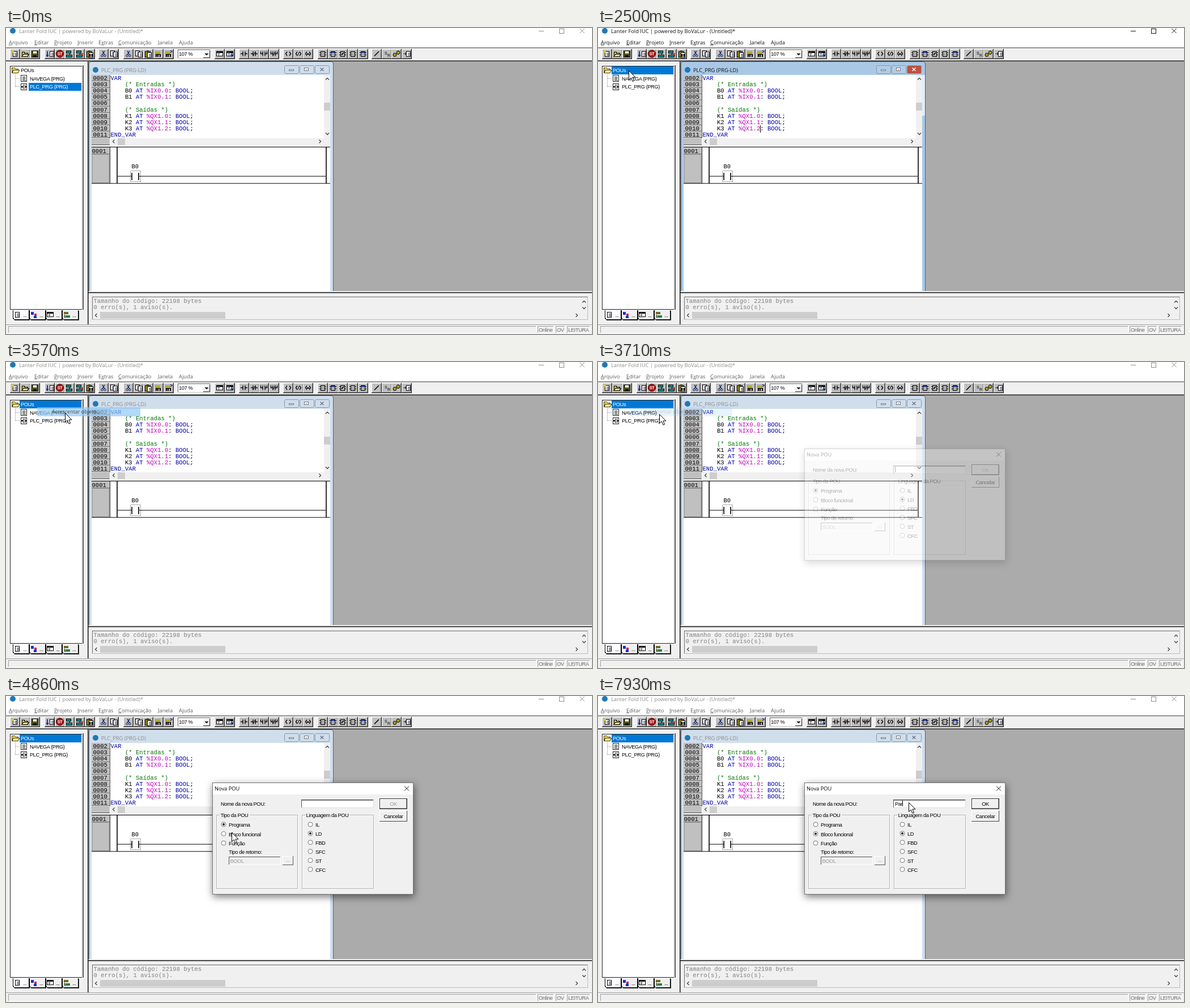
These frames come from a looping animation (1034 px wide and 541 px high, 8000 ms). An HTML page:

```html
<!DOCTYPE html>
<html lang="pt">
<head>
<meta charset="utf-8">
<title>Nova POU</title>
<style>
html,body{margin:0;width:100%;height:100%;overflow:hidden;background:#f0f0f0}
svg{display:block;width:100vw;height:100vh}
text{white-space:pre}
rect,path{shape-rendering:crispEdges}
.soft,.soft *{shape-rendering:auto}
.ui{font:9.3px "Open Sans","Noto Sans",sans-serif}
.ctx{font:9px "Open Sans","Noto Sans",sans-serif}
.ms{font:9.3px "Liberation Sans",Arial,sans-serif;letter-spacing:-.42px}
.mono{font:10.6px "Liberation Mono",monospace}
.mid{text-anchor:middle}
.k{fill:#0000a8}.m{fill:#c000c0}.g{fill:#007800}
.dim{fill:#6d6d6d}.off{fill:#9a9a9a}.inv{fill:#fff}
.u{text-decoration:underline}
.cap{fill:#8c8c8c}.menu{fill:#606060}.ctl{stroke:#8c8c8c;fill:none}
.frame{fill:#d0deec}.cbtn,.cx{fill:#d0deec}.cxi{stroke:#6c7682}.edge{fill:#d0deec}
.on .cap,.on .menu{fill:#111}.on .ctl{stroke:#111}
.on .frame{fill:#a9c8e6}.on .cbtn{fill:#b4cde6}.on .cx{fill:#c0503f}.on .cxi{stroke:#fff}
.on .edge{fill:#e2edf7}
</style>
</head>
<body>
<svg id="stage" viewBox="0 0 1034 541" preserveAspectRatio="none" xmlns="http://www.w3.org/2000/svg"></svg>
<script>
const FACE = '#f0f0f0', GREY = '#c0c0c0', BLUE = '#0078d7', SOFT = 'class="soft"';
const R = (x, y, w, h, f, a = '') => `<rect x="${x}" y="${y}" width="${w}" height="${h}" fill="${f}" ${a}/>`;
const T = (x, y, s, c, a = '') => `<text x="${x}" y="${y}" class="${c}" ${a}>${s}</text>`;
const P = (d, s = '#000', w = 1, f = 'none', a = '') => `<path d="${d}" stroke="${s}" stroke-width="${w}" fill="${f}" ${a}/>`;
const G = (id, s, a = '') => `<g id="${id}" ${a}>${s}</g>`;
const at = (x, y, s) => `<g transform="translate(${x} ${y})">${s}</g>`;
const bevel = (x, y, w, h, face, tl, br) => R(x, y, w, h, br) + R(x, y, w - 1, h - 1, tl) + R(x + 1, y + 1, w - 2, h - 2, face);
const chev = (x, y, dir) => at(x, y, `<g transform="rotate(${dir})">${P('M-1.5 -3L1.5 0L-1.5 3', '#444', 1.3, 'none', SOFT)}</g>`);
const disc = (x, y, r, f, a = '') => `<circle cx="${x}" cy="${y}" r="${r}" fill="${f}" ${a}/>`;

// toolbar icons, drawn around 0,0
const sheet = (x, y, f = '#fff') => R(x, y, 7, 9, f, 'stroke="#000"') + P(`M${x + 2} ${y + 3}h4m-4 2h4m-4 2h4`, '#446', 1);
const glyph = {
  new: sheet(-3.5, -4.5) + R(-6, -6, 4, 4, '#d8c820'),
  open: P('M-6 5V-3H-2L-1 -1H4V5Z', '#000', 1, '#e0c83c') + P('M-6 5L-3 1H6L4 5Z', '#000', 1, '#f4e478'),
  save: R(-5.5, -5.5, 11, 11, '#56561c', 'stroke="#000"') + R(-3, -5, 6, 4, '#fff') + R(-3, 2, 6, 4, '#111'),
  run: sheet(0.5, -4.5) + P('M-4 -5V4M-6 2L-4 5L-2 2', '#2038b0', 1.5),
  stop: disc(0, 0, 6.5, '#b01818', 'stroke="#400"') + T(0, 2.6, 'ST', 'ms mid', 'fill="#fff" style="font-size:7px;font-weight:700"'),
  link: R(-5.5, -5.5, 8, 4, '#1c8c8c', 'stroke="#000"') + R(-5.5, 1.5, 10, 4, '#1c8c8c', 'stroke="#000"') + P('M0 -1V1'),
  cut: P('M-2 -5L2 2M2 -5L-2 2', '#102070', 1.4, 'none', SOFT) + disc(-2.5, 3.5, 1.8, 'none', 'stroke="#102070"') + disc(2.5, 3.5, 1.8, 'none', 'stroke="#102070"'),
  copy: sheet(-5.5, -5.5) + sheet(-0.5, -3.5),
  paste: R(-5.5, -4.5, 9, 10, '#8c8424', 'stroke="#000"') + R(-3, -6, 4, 2, '#222') + sheet(-1.5, -2.5),
  find: R(-6, -5, 9, 6, '#b8ac30') + P('M-4 0V5M-1 0V5M3 0V5', '#000', 2.6) + P('M-4 1H4'),
  grid: R(-5.5, -4.5, 11, 8, '#fff', 'stroke="#000"') + P('M-5 -3H5', '#000', 2) + P('M-4 0H1M-2 -4V3', '#555'),
  no: P('M-6 0H-2M-2 -4V4M2 -4V4M2 0H6', '#000', 1.4, 'none', SOFT),
  coil: P('M-2 -3.5L-4.5 0L-2 3.5M2 -3.5L4.5 0L2 3.5', '#000', 1.3, 'none', SOFT),
  box: R(-3.5, -4.5, 7, 9, '#a8a8a8', 'stroke="#000"') + P('M-6 -2H-3M-6 2H-3M3 -2H6M3 2H6'),
  pen: P('M-4 4L4 -4', '#000', 1.6, 'none', SOFT),
  sr: T(-4, 1, 'S', 'ms', 'style="font-size:7px"') + T(1, 5, 'R', 'ms', 'style="font-size:7px"'),
  eyes: disc(-3, 2, 3, '#a8a020', 'stroke="#000"') + disc(3, -2, 3, '#a8a020', 'stroke="#000"'),
};
glyph.linkx = glyph.link + P('M2 -1L6 3M6 -1L2 3', '#c01818', 1.4);
glyph.clip = glyph.paste + P('M0 0V5M4 0V5', '#000', 2.4);
glyph.next = glyph.find + P('M3 -6L6 -4L3 -2', '#2038b0', 1.5);
glyph.gridx = glyph.grid + P('M3 -2V4M1 2L3 5L5 2', '#2050d0', 1.4);
glyph.nc = glyph.no + P('M-2 4L2 -4', '#000', 1, 'none', SOFT);
glyph.por = P('M-5.5 -4V0H-2M-2 -4V4M2 -4V4M2 0H5.5V-4', '#000', 1.3, 'none', SOFT);
glyph.pnc = glyph.por + P('M-2 4L2 -4', '#000', 1, 'none', SOFT);
glyph.coilx = glyph.coil + P('M-1 3L1 -3', '#000', 1, 'none', SOFT);
glyph.coils = glyph.coil + P('M-2 0H2', '#000', 2);
glyph.boxb = glyph.box + P('M-3 -3H3', '#2038b0', 2);
glyph.boxx = glyph.box + P('M-2 2L2 -2');
glyph.out = sheet(-0.5, -4.5) + P('M-6 0H-1M-3 -2L-1 0L-3 2', '#2038b0', 1.3);

const bar = [
  [16, 'new open save'], [77, 'run stop link linkx clip'], [172, 'cut copy'],
  [216, 'cut copy paste find next'], [377, 'grid gridx'], [420, 'no nc por pnc'],
  [498, 'coil coilx coils'], [559, 'box boxb boxx box boxb'], [654, 'pen sr eyes out'],
];
const toolbar = () => bar.map(([x, names]) => names.split(' ').map((n, i) => {
  const cx = Math.round(x + i * 17.7);
  return R(cx - 9, 37, 18, 18, '#222') + R(cx - 9, 37, 17, 17, '#fff') + R(cx - 8, 38, 15, 15, GREY) +
    P(`M${cx - 8} 53.5H${cx + 7.5}V38`, '#808080') + at(cx, 45.5, glyph[n]);
}).join('')).join('') +
  bevel(303, 38, 58, 16, '#fff', '#666', '#ccc') + T(305, 49, '107 %', 'ms') +
  bevel(348, 40, 12, 13, FACE, '#fff', '#333') + P('M351 45H357L354 48.5Z', 'none', 0, '#000');

function header() {
  const menus = [[5, 'Arquivo', 0], [50, 'Editar', 0], [85, 'Projeto', 0], [126, 'Inserir', 0],
    [163, 'Extras', 1], [198, 'Comunicação', 0], [268, 'Janela', 0], [305, 'Ajuda', 1]];
  return R(0, 0, 1034, 35, '#fff') + disc(12, 5, 5, '#1f78b4') +
    T(23, 9, 'Lanter Fold IUC | powered by BoVaLur - (Untitled)*', 'ui cap') +
    '<path d="M940 5.5H949M976.5 1.5H984.5V9.5H976.5Z" class="ctl"/>' +
    '<path d="M1012.5 1L1020.5 9M1020.5 1L1012.5 9" class="ctl soft"/>' +
    menus.map(([x, s, i]) => T(x, 28.5, `${s.slice(0, i)}<tspan class="u">${s[i]}</tspan>${s.slice(i + 1)}`, 'ui menu')).join('') +
    R(0, 35, 1034, 23, FACE) + R(0, 34.5, 1034, 1, '#333', SOFT) + toolbar() + R(0, 57.5, 1034, 1.4, '#111', SOFT);
}

function treePanel() {
  const folder = P('M10.5 79.5V70.5H15.5L17 72H21.5V79.5Z', '#4a4214', 1, '#e8d468') + P('M10.5 79.5L13 74.5H23.5L21.5 79.5Z', '#4a4214', 1, '#fff0a0');
  const leaf = y => R(26.5, y - 5.5, 10, 11, '#fff', 'stroke="#222"');
  const tabs = [12, 41, 70, 99].map((x, i) => P(`M${x + .5} 499V513L${x + 2.5} 515.5H${x + 28}V499`, '#000', 1, i ? FACE : '#fff') +
    P(`M${x + 3} 516H${x + 29}V500`, '#333') + T(x + 18, 511, '...', 'ms') + at(x + 8, 507, [
    sheet(-3.5, -4.5), R(-5, -5, 5, 5, '#2030c0') + R(1, -2, 4, 4, '#c02060') + R(0, 2, 5, 4, '#2030c0'),
    glyph.grid, R(-5, -5, 8, 4, '#6c6c20') + R(-2, 1, 8, 4, '#208040') + P('M-4 0V4H-2')][i])).join('');
  return R(0, 59, 144, 465, FACE) + R(7, 67, 127, 431, '#222') + R(8, 68, 125, 429, '#fff') + R(133, 68, 1, 429, '#ddd') +
    R(135.4, 66, 1.4, 432, '#222', SOFT) + R(144, 58, 1.6, 466, '#222', SOFT) + folder +
    P('M16.5 81V103.5M17 89.5H25M17 103.5H25', '#888', 1, 'none', 'stroke-dasharray="1 1"') +
    leaf(89) + P('M29 86.5H34M29 88.5H35M29 90.5H34M29 92.5H35', '#333') +
    leaf(104) + P('M27 104H30M30.5 100V108M33.5 100V108M34 104H37', '#000', 1.2) +
    T(26, 78, 'POUs', 'ms') + T(42, 92.5, 'NAVEGA (PRG)', 'ms') + T(42, 107, 'PLC_PRG (PRG)', 'ms') + tabs +
    G('selLeaf', R(40, 97, 93, 14, BLUE) + T(42, 107, 'PLC_PRG (PRG)', 'ms inv')) +
    G('selRoot', R(24, 68, 109, 14, BLUE) + T(26, 78, 'POUs', 'ms inv'));
}

const code = ['VAR', '    (* Entradas *)', '    B0 AT %IX0.0: BOOL;', '    B1 AT %IX0.1: BOOL;', '',
  '    (* Saídas *)', '    K1 AT %QX1.0: BOOL;', '    K2 AT %QX1.1: BOOL;', '    K3 AT %QX1.2: BOOL;', 'END_VAR'];
const paint = s => s.replace(/%\w+\.\d|\b(?:END_VAR|VAR|AT|BOOL)\b/g, m => `<tspan class="${m[0] == '%' ? 'm' : 'k'}">${m}</tspan>`);

function child() {
  const rows = code.map((s, i) => {
    const y = 83 + i * 11.1, yt = (y + 9).toFixed(1);
    return R(151, Math.round(y + 10.4), 32, 1, '#666') + R(151, Math.round(y + 11.4), 32, 1, '#dcdcdc') +
      T(153.5, yt, String(i + 2).padStart(4, 0), 'mono') + T(184.5, yt, paint(s), 'mono' + (s.includes('(*') ? ' g' : ''));
  }).join('');
  const btn = (x, c) => `<rect x="${x}.5" y="66.5" width="25" height="14" rx="2" class="${c} soft" stroke="#8796a8"/>`;
  return R(146, 59, 888, 406, '#ababab') +
    '<path d="M146.5 466V64Q146.5 59.5 151 59.5H573Q577.5 59.5 577.5 64V466Z" class="frame soft" stroke="#56636f"/>' +
    '<rect x="572" y="83" width="5" height="72" class="edge"/>' +
    disc(158, 74, 5, '#1f78b4') + T(168, 77.5, 'PLC_PRG (PRG-LD)', 'ui cap') +
    btn(491, 'cbtn') + btn(518, 'cbtn') + btn(545, 'cx') +
    R(499.5, 73.5, 8, 2, '#fff', 'stroke="#6c7682"') + R(526.5, 70.5, 7, 5, '#fff', 'stroke="#6c7682"') + R(529, 72.5, 2, 1, '#6c7682') +
    '<path d="M554.5 70.5L560.5 76M560.5 70.5L554.5 76" class="cxi soft" stroke-width="1.4"/>' +
    R(151, 83, 421, 382, '#fff') + R(151, 83, 32, 124, GREY) + R(183, 83, 1, 112, '#555') + rows +
    R(561, 83, 11, 124, FACE) + R(561, 132, 11, 14, '#cdcdcd') + chev(567, 90, -90) + chev(567, 187, 90) +
    R(184, 195, 377, 12, FACE) + R(197, 195, 13, 12, '#cdcdcd') + chev(190, 200.5, 180) + chev(554, 200.5, 0) +
    R(151, 206, 32, 1, '#555') + R(151, 207, 421, 3, FACE) + R(151, 210, 421, 1, '#000') +
    R(151, 211, 32, 64, GREY) + R(151, 222, 32, 1, '#777') + R(152.5, 223.5, 29, 50, GREY, 'stroke="#999"') +
    T(151.5, 220.5, '0001', 'mono') + R(183, 211, 1, 64, '#222') +
    R(195.3, 211, 1.6, 64, '#000', SOFT) + R(564.2, 211, 1.6, 64, '#000', SOFT) + R(151, 274.3, 421, 1, '#000', SOFT) +
    R(197, 261.6, 367, 1, '#000', SOFT) + R(220, 253, 18, 19, '#fff') +
    R(219.5, 252.5, 18, 19, 'none', 'stroke="#555" stroke-dasharray="1 1"') +
    R(220, 261.6, 2, 1, '#000', SOFT) + R(235, 261.6, 3, 1, '#000', SOFT) +
    R(221.3, 256, 1.6, 13, '#000', SOFT) + R(233.3, 256, 1.6, 13, '#000', SOFT) +
    T(221.5, 248, 'B0', 'mono') + G('codeCaret', R(286, 172, 1, 13, '#000'));
}

function footer() {
  const cell = (x, w, s) => bevel(x, 527, w, 13, FACE, '#a0a0a0', '#fff') + T(x + 2, 537, s, 'ms', 'fill="#6d6d6d"');
  return R(146, 465, 888, 59, FACE) + R(145, 467, 889, 1.6, '#222', SOFT) +
    bevel(152, 475, 875, 41, FACE, '#696969', '#bbb') +
    T(154.5, 486, 'Tamanho do código: 22198 bytes', 'mono', 'fill="#808080"') +
    T(154.5, 497, '0 erro(s), 1 aviso(s).', 'mono', 'fill="#808080"') +
    R(166, 502, 221, 12, '#cdcdcd') + chev(159, 508, 180) + chev(1007, 508, 0) + chev(1020, 484, -90) + chev(1020, 495, 90) +
    R(0, 524, 1034, 17, FACE) + R(0, 524, 1034, 1, '#a0a0a0') +
    cell(4, 932, '') + cell(938, 29, 'Online') + cell(970, 17, 'OV') + cell(990, 41, 'LEITURA');
}

// items marked * are enabled, | is a separator
const entries = ['*Acrescentar objeto...', 'Renomear objeto...', 'Editar objeto', '*Copiar objeto', 'Apagar objeto',
  'Converter objeto...', 'Exportar objeto...', 'Propriedades do objeto...', '*Base de dados do projeto', '|',
  'Acrescentar ação', '|', '*Nova pasta', 'Expandir nó', '*Colapsar nó', '|', 'Mostrar instância...',
  'Mostrar árvore de chamada', '|', 'Salvar como modelo...', '|', 'Excluir da compilação'];
function popup() {
  let y = 79.3, s = R(53.5, 77.5, 186, 328.5, '#f2f2f2', 'stroke="#b4b4b4" style="filter:drop-shadow(2px 2px 1px #0008)"');
  for (const e of entries) {
    if (e == '|') { s += R(80, Math.round(y + 2.4), 157, 1, '#cfcfcf'); y += 5.5; continue; }
    const live = e[0] == '*';
    s += T(81, (y + 12).toFixed(1), e.slice(live), 'ctx' + (live ? '' : ' dim'));
    y += 17.5;
  }
  return s + chev(228, 227.5, 0);
}

const radio = (x, y, label, id = '') => disc(x, y, 4, '#fff', 'stroke="#777"') +
  (id && G(id, disc(x, y, 1.9, '#000'))) + T(x + 9, y + 4, label, 'ms');
function dialog() {
  const box = (x, w, tw, s) => R(x + 1.5, 211.5, w, 130, 'none', 'stroke="#fff"') + R(x + .5, 210.5, w, 130, 'none', 'stroke="#b0b0b0"') +
    R(x + 6, 208, tw, 5, FACE) + T(x + 7.5, 213.5, s, 'ms');
  return R(364.5, 153.5, 354, 196.5, FACE, 'stroke="#777" style="filter:drop-shadow(1px 4px 7px #0008)"') +
    R(365, 154, 353, 20, '#fff') + T(368, 167, 'Nova POU', 'ui') +
    P('M703 159.5L711 167.5M711 159.5L703 167.5', '#111', 1, 'none', SOFT) +
    T(379, 194, 'Nome da nova POU:', 'ms') + bevel(521, 183, 128, 15, '#fff', '#555', '#ddd') + R(522, 184, 126, 1, '#888') +
    R(659, 181, 49, 19, '#333') + bevel(660, 182, 47, 17, FACE, '#fff', '#888') + T(683.5, 193.5, 'OK', 'ms mid', 'id="ok"') +
    R(659, 203, 49, 19, '#444') + R(659, 203, 48, 18, '#fff') + R(660, 204, 47, 17, FACE) + T(683.5, 215.5, 'Cancelar', 'ms mid') +
    box(371, 143, 53, 'Tipo da POU') + box(522, 126, 78, 'Linguagem da POU') +
    radio(384, 227, 'Programa', 'optA') + radio(384, 243.5, 'Bloco funcional', 'optB') + radio(384, 260, 'Função') +
    T(393, 279, 'Tipo de retorno:', 'ms') + bevel(393, 284, 92, 15, FACE, '#555', '#fff') + T(395.5, 294.5, 'BOOL', 'ms off') +
    bevel(488, 283, 19, 16, FACE, '#fff', '#555') + T(497.5, 293, '...', 'ms mid off') +
    ['IL', 'LD', 'FBD', 'SFC', 'ST', 'CFC'].map((s, i) => radio(537, 227 + i * 15.9, s, i == 1 ? 'optLD' : '')).join('') +
    T(524, 193.5, '', 'ms', 'id="field"') + G('caret', R(0, 185, 1, 10, '#000'));
}

stage.innerHTML = header() + child() + treePanel() + footer() +
  G('popup', popup()) + G('hot', R(55, 80, 182, 16, '#91c9f7') + T(81, 91.3, 'Acrescentar objeto...', 'ctx')) +
  G('dialog', dialog()) +
  G('mouse', P('M.5 .5V16.5L4.2 13L7 19.3L9.6 18.2L6.9 12.1H12Z', '#000', 1, '#fff', SOFT));

const $ = Object.fromEntries([...stage.querySelectorAll('[id]')].map(e => [e.id, e]));
const LOOP = 8000, TICK = 1000 / 14;
const path = [[1500, 26, -6], [1710, 42, 30], [1860, 57, 68], [2000, 52, 76], [2140, 52, 76.5], [2290, 54, 75], [3000, 54, 75],
  [3070, 69, 80], [3140, 82, 84], [3360, 104, 90], [3570, 104, 90], [3710, 108, 92], [3860, 142, 116], [4070, 270, 190],
  [4290, 388, 238], [4360, 396, 241], [4640, 398, 242], [5070, 398, 241], [5290, 470, 240], [5500, 540, 237],
  [5570, 547, 237], [5720, 547, 237], [5930, 549, 202], [6000, 547, 187], [6140, 547, 184], [6290, 547, 184], [6430, 548, 188]];
const menuFade = [[0, 0], [2640, .3], [2710, .6], [2790, .85], [2860, 1], [3570, 0]];
const hotFade = [[0, 0], [3140, 1], [3570, .7], [3640, .45], [3710, .2], [3780, 0]];
const boxFade = [[0, 0], [3710, .3], [3780, .7], [3860, .96], [3930, 1]];
const blink = [[0, 0], [3710, 1], [4430, 0], [4930, 1], [5000, 0], [6570, 1], [7210, 0], [7640, 1]];
const typed = [[0, 0], [7640, 1], [7860, 2], [7930, 3]];

const step = (table, t) => table.filter(k => k[0] <= t).pop()[1];
function pointer(t) {
  const i = path.findIndex(k => k[0] > t);
  if (i < 0) return path[path.length - 1].slice(1);
  const [a, b] = [path[i - 1], path[i]], p = (t - a[0]) / (b[0] - a[0]);
  return [a[1] + (b[1] - a[1]) * p, a[2] + (b[2] - a[2]) * p];
}
const show = (el, on) => el.setAttribute('visibility', on ? 'visible' : 'hidden');
const fade = (el, o) => { el.style.display = o ? '' : 'none'; el.setAttribute('opacity', o); };

function draw(now) {
  // the picture ticks 14 times a second, rounded to 10 ms
  const n = Math.floor((now % LOOP + 5) / TICK), t = Math.round(n * TICK / 10) * 10;
  const active = t >= 2430 && t < 3570, count = step(typed, t), block = t >= 5000;
  stage.classList.toggle('on', active);
  show($.selLeaf, t < 2430);
  show($.selRoot, t >= 2430);
  show($.codeCaret, t >= 2500 && active);
  fade($.popup, step(menuFade, t));
  fade($.hot, step(hotFade, t));
  fade($.dialog, step(boxFade, t));
  show($.optA, !block);
  show($.optB, block);
  $.ok.setAttribute('fill', count ? '#000' : '#a0a0a0');
  $.field.textContent = 'Par'.slice(0, count);
  show($.caret, step(blink, t));
  $.caret.setAttribute('transform', `translate(${[524, 530, 535, 537][count]} 0)`);
  show($.mouse, t >= 1500);
  if (t >= 1500) $.mouse.setAttribute('transform', `translate(${pointer(t).map(Math.round).join(' ')})`);
}
const start = performance.now();
function loop() {
  draw(performance.now() - start);
  requestAnimationFrame(loop);
}
loop();
</script>
</body>
</html>
```
